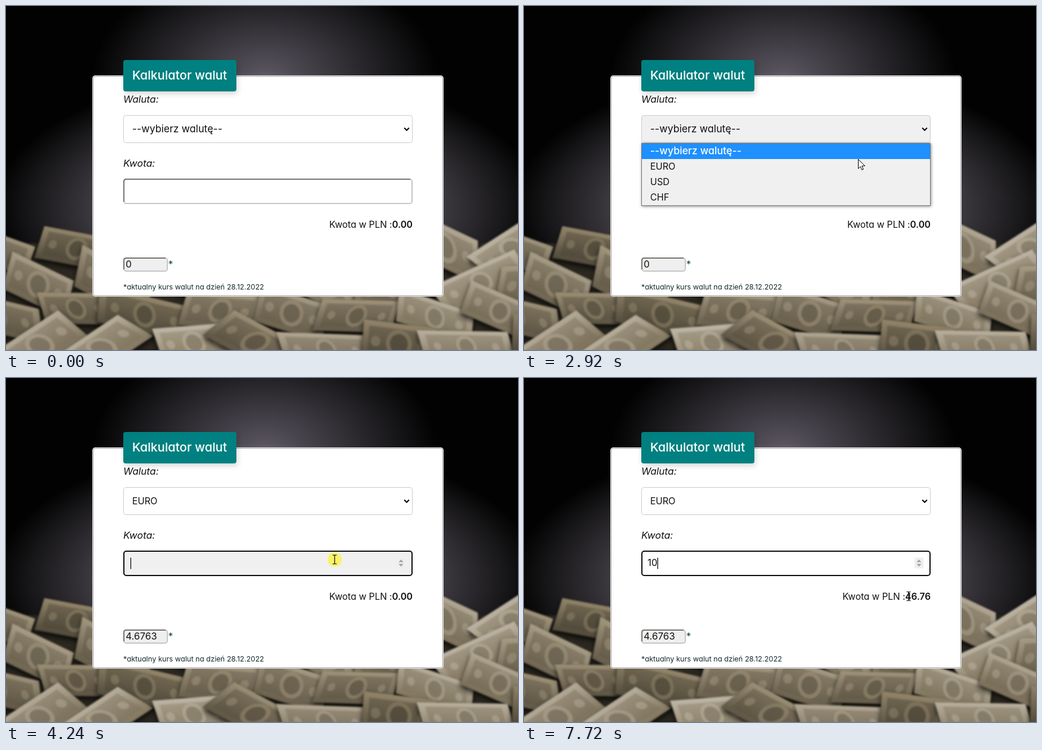
Recreate the animation shown at these times as an HTML page with a canvas. Size 860 px wide and 580 px high, loop 8000 ms.

```html
<!DOCTYPE html>
<html lang="pl">
<head>
<meta charset="utf-8">
<title>Kalkulator walut</title>
<style>
html, body { margin: 0; width: 100%; height: 100%; overflow: hidden; background: #000; }
canvas, svg { position: absolute; left: 0; top: 0; width: 860px; height: 580px; }
text { font: 400 16px Inter, "Open Sans", sans-serif; font-feature-settings: "cv11"; fill: #111; white-space: pre; }
.title { font-size: 20.5px; font-weight: 500; fill: #fff; }
.label { font-size: 16.5px; font-style: italic; }
.prompt { font-size: 16.8px; }
.short { font-size: 15.4px; }
.bold { font-weight: 600; }
.note { font-size: 12.1px; fill: #12282c; }
.star { fill: #0c4848; }
.picked { fill: #fff; font-weight: 500; }
</style>
</head>
<body>
<canvas id="photo" width="860" height="580"></canvas>
<svg viewBox="0 0 860 580">
  <defs>
    <filter id="soft" x="-20%" y="-40%" width="140%" height="200%">
      <feDropShadow dx="2" dy="4" stdDeviation="5" flood-color="#000" flood-opacity=".16"/>
    </filter>
    <filter id="listShade" x="-5%" y="-10%" width="110%" height="125%">
      <feDropShadow dx="1" dy="1" stdDeviation="2.5" flood-color="#000" flood-opacity=".45"/>
    </filter>
  </defs>

  <rect x="145" y="117" width="590" height="373" rx="5" fill="#f2f2f2"/>
  <rect x="146.5" y="118.5" width="587" height="370" rx="3.5" fill="#fff" stroke="#9c9c9c"/>

  <rect x="197" y="91" width="190" height="53" rx="4" fill="#008080" filter="url(#soft)"/>
  <text class="title" x="212" y="124">Kalkulator walut</text>

  <text class="label" x="197" y="163">Waluta:</text>
  <rect id="select" rx="4"/>
  <text id="choice" x="212" y="213"></text>
  <path d="M669 205.500L673 209.500L677 205.500" fill="none" stroke="#000" stroke-width="2"/>

  <text class="label" x="197" y="271">Kwota:</text>
  <rect id="field" x="198" y="292" width="484" height="41" rx="4" stroke-width="2"/>
  <path id="fieldEdge" d="M198 330V296q0-4 4-4H679" fill="none" stroke="#767676" stroke-width="2"/>
  <g id="spinner">
    <rect x="656" y="303" width="15" height="18" fill="#efefef"/>
    <path d="M659.500 310.500l4-4.500l4 4.500zm0 3l4 4.500l4-4.500z" fill="#a3a3a3"/>
  </g>
  <text id="amount" x="207.500" y="317" fill="#111"></text>
  <rect id="caret" y="303" width="1.200" height="19"/>

  <text class="short" x="683" y="374" text-anchor="end">Kwota w PLN :<tspan id="total" class="bold"></tspan></text>

  <rect x="198" y="425" width="73" height="22" rx="4" fill="#efefef" stroke="#c6c6c6" stroke-width="2"/>
  <path d="M198 444V429q0-4 4-4H268" fill="none" stroke="#76776f" stroke-width="2"/>
  <text id="rate" x="201" y="441"></text>
  <text class="star" x="272.500" y="441">*</text>
  <text class="note" x="197" y="478">*aktualny kurs walut na dzień 28.12.2022</text>

  <g id="list">
    <rect x="197.500" y="231.500" width="485" height="105" fill="#f0f0f0" stroke="#767676" filter="url(#listShade)"/>
    <rect id="bar" x="198" width="484" height="26" fill="#1e90ff"/>
  </g>

  <circle id="press" r="12" fill="#f7f36c"/>
  <path id="arrow" d="M.500 .500V16.200L4.100 12.700L6.500 18.300L9 17.200L6.600 11.700H11.600Z" fill="#fff" stroke="#000"/>
  <path id="beam" d="M-3.500-7.500H-1l1 1l1-1H3.500M0-6.500v13M-3.500 7.500H-1l1-1l1 1H3.500" fill="none" stroke="#111" stroke-width="1.200"/>
</svg>
<script>
const LOOP = 8000, STEP = 70;
const $ = id => document.getElementById(id);
const show = (id, on) => $(id).setAttribute('visibility', on ? 'visible' : 'hidden');
const set = (id, attrs) => { for (const k in attrs) $(id).setAttribute(k, attrs[k]); };
const within = (t, a, b) => t >= a && t < b;

// ---- backdrop ----
const ctx = $('photo').getContext('2d');
const tone = (l, a = 1) => `hsla(40,16%,${l}%,${a})`;

let seed = 11;
const rand = (min, max) => {
  seed = (seed * 16807) % 2147483647;
  return min + (max - min) * seed / 2147483647;
};

function glow(x, y, rx, ry, color) {
  ctx.save();
  ctx.globalCompositeOperation = 'lighter';
  ctx.translate(x, y);
  ctx.scale(rx, ry);
  const g = ctx.createRadialGradient(0, 0, 0, 0, 0, 1);
  g.addColorStop(0, color);
  g.addColorStop(1, '#000');
  ctx.fillStyle = g;
  ctx.fillRect(-1, -1, 2, 2);
  ctx.restore();
}

function oval(x, r, fill) {
  ctx.beginPath();
  ctx.ellipse(x, 0, r, r * 1.1, 0, 0, 7);
  ctx.fillStyle = fill;
  ctx.fill();
}

function drawBill(x, y, w, h, angle, light) {
  ctx.save();
  ctx.translate(x, y);
  ctx.rotate(angle);
  ctx.transform(1, 0, rand(-0.5, 0.5), 1, 0, 0);
  const paper = ctx.createLinearGradient(0, -h / 2, 0, h / 2);
  paper.addColorStop(0, tone(light + 8));
  paper.addColorStop(1, tone(light - 14));
  ctx.shadowColor = 'rgba(0,0,0,.8)';
  ctx.shadowBlur = 10;
  ctx.shadowOffsetY = 5;
  ctx.fillStyle = paper;
  ctx.fillRect(-w / 2, -h / 2, w, h);
  ctx.shadowColor = 'transparent';
  ctx.fillStyle = tone(light - 18, 0.4);
  ctx.fillRect(-w * 0.42, -h * 0.36, w * 0.84, h * 0.72);
  oval(0, h * 0.32, tone(light + 5, 0.6));
  oval(0, h * 0.22, tone(light - 25, 0.5));
  for (const side of [-1, 1]) oval(side * w * 0.32, h * 0.12, tone(light + 8, 0.5));
  ctx.restore();
}

function drawPhoto() {
  ctx.fillStyle = '#020202';
  ctx.fillRect(0, 0, 860, 580);
  glow(435, 120, 290, 190, '#5a5560');
  glow(440, 340, 460, 230, '#a098a8');

  ctx.filter = 'blur(1.5px)';
  ctx.fillStyle = tone(15);
  ctx.fillRect(0, 400, 860, 180);
  for (let row = 0; row < 4; row++) {
    for (let col = 0; col < 8; col++) {
      const x = col * 120 + (row % 2) * 60 + rand(-20, 20);
      drawBill(x, 410 + row * 54 + rand(-8, 8), rand(115, 160), rand(52, 70), rand(-0.6, 0.5), rand(38, 62));
    }
  }
  ctx.filter = 'none';
}

// ---- dropdown rows ----
const rows = ['--wybierz walutę--', 'EURO', 'USD', 'CHF'].map((label, i) => {
  const row = document.createElementNS('http://www.w3.org/2000/svg', 'text');
  row.setAttribute('x', 212);
  row.setAttribute('y', 250 + i * 26);
  row.textContent = label;
  $('list').append(row);
  return row;
});
const rowClass = i => i ? 'short' : 'prompt';

// ---- pointer: start, end, x, y ----
const moves = [
  [720, 1140, 619, 267], [1400, 1960, 573, 218],
  [2500, 2920, 561, 258], [2990, 3200, 553, 271],
  [3600, 3810, 553, 290], [3880, 4090, 552, 306],
  [6090, 6580, 574, 348], [7170, 7660, 646, 368]
];

function pointer(t) {
  let x = 782, y = 540;
  for (const [a, b, tx, ty] of moves) {
    if (t < a) break;
    const n = Math.round((b - a) / STEP);
    const u = Math.min(1, (Math.floor((t - a) / STEP) + 1) / (n + 1));
    const e = u * u * (3 - 2 * u);
    x += (tx - x) * e;
    y += (ty - y) * e;
  }
  return [Math.round(x), Math.round(y)];
}

function draw(t) {
  const [x, y] = pointer(t);
  const chosen = t >= 3340;
  const open = within(t, 2170, 3340);
  const selectFocus = within(t, 3340, 4170);
  const fieldFocus = t >= 4170;
  const fieldHover = t >= 3600 && y > 291 && y < 334;
  const selectHover = open || (within(t, 1400, 2170) && y < 231);

  const inset = selectFocus ? 1 : 0.5;
  set('select', {
    x: 197 + inset, y: 184 + inset, width: 486 - 2 * inset, height: 47 - 2 * inset,
    fill: selectHover ? '#f0f0f0' : '#fff',
    stroke: selectFocus ? '#101010' : '#ccc', 'stroke-width': 2 * inset
  });
  const current = chosen ? 1 : 0;
  $('choice').textContent = rows[current].textContent;
  set('choice', { class: rowClass(current) });

  show('list', open);
  const active = y > 258 ? 1 : 0;
  set('bar', { y: 232 + active * 26 });
  rows.forEach((r, i) => r.setAttribute('class', rowClass(i) + (i === active ? ' picked' : '')));

  set('field', { fill: fieldHover ? '#f0f0f0' : '#fff', stroke: fieldFocus ? '#101010' : '#c6c6c6' });
  show('fieldEdge', !fieldFocus);
  show('spinner', fieldFocus || fieldHover);

  const typed = t < 5300 ? '' : t < 5560 ? '1' : '10';
  $('amount').textContent = typed;
  $('total').textContent = (typed * 4.6763).toFixed(2);
  $('rate').textContent = chosen ? '4.6763' : '0';

  // every keystroke restarts the blink
  const lastKey = t < 5300 ? 4240 : t < 5560 ? 5300 : 5560;
  set('caret', { x: [209, 214, 224][typed.length] });
  show('caret', t >= 4240 && Math.floor((t - lastKey) / 530) % 2 === 0);

  const beam = fieldHover || (t > 7000 && y > 356);
  const place = { transform: `translate(${x} ${y})` };
  ['arrow', 'beam', 'press'].forEach(id => set(id, place));
  show('arrow', t >= 720 && !beam);
  show('beam', beam);
  show('press', [2170, 3340, 4310].some(end => within(t, end - 140, end)));
}

function tick() {
  draw(performance.now() % LOOP);
  requestAnimationFrame(tick);
}

drawPhoto();
tick();
</script>
</body>
</html>
```
